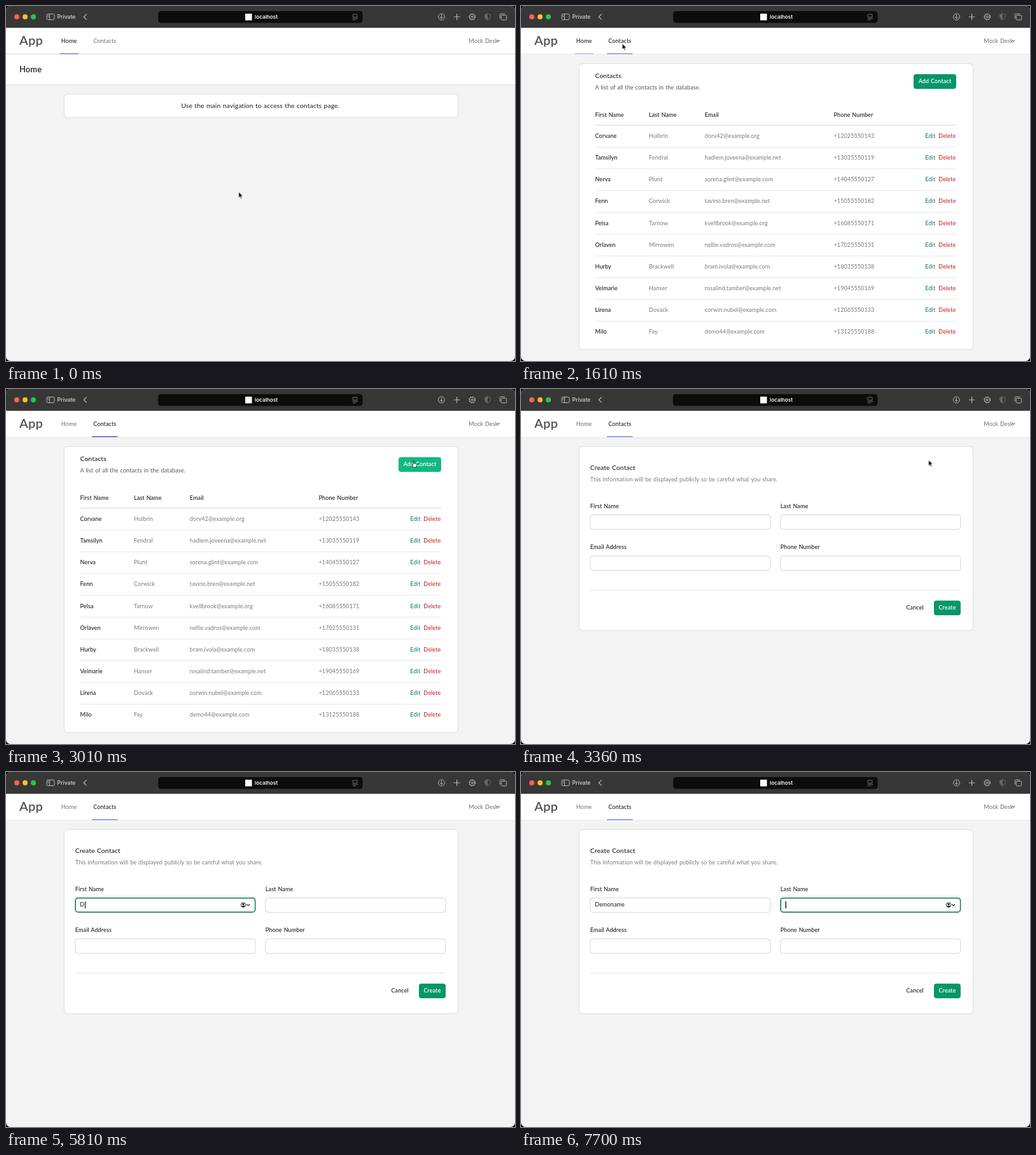
Write an HTML page that moves like this. It is 800 by 557 pixels and loops after 8000 ms.

```html
<!DOCTYPE html>
<html lang="en">
<head>
<meta charset="utf-8">
<title>Contacts app</title>
<style>
  html, body { margin: 0; width: 100%; height: 100%; overflow: hidden; background: #000; }
  #stage { position: relative; width: 800px; height: 557px; overflow: hidden; border-radius: 7px; background: #f3f3f3; }
  svg { position: absolute; left: 0; top: 0; }
  text, #typed { font-family: Lato, sans-serif; font-size: 9px; letter-spacing: .012em; word-spacing: .06em; }
  text { fill: #1b1f27; }
  .chrome text { font: 600 8.5px Inter, sans-serif; letter-spacing: 0; fill: #c4c4c4; }
  .icon { fill: none; stroke: #b4b4b4; stroke-width: 1; stroke-linecap: round; stroke-linejoin: round; }
  .lg { font-size: 10.3px; }
  .md { font-weight: 500; }
  .sb { font-weight: 600; }
  .dim { fill: #757a83; }
  .sub { fill: #52565f; }
  .edit { fill: #128a63; }
  .del { fill: #c62f2f; }
  .btn { fill: #059669; }
  .onbtn { fill: #fff; font-weight: 600; text-anchor: middle; }
  .card { fill: #fff; filter: drop-shadow(0 .7px .8px #0003); }
  .input { fill: #fff; stroke: #d3d5d9; }
  .focus { fill: none; stroke: #0b7a5b; stroke-width: 1.5; }
  .rule { stroke: #e6e6e8; }
  #typed { position: absolute; left: 116.3px; top: 200.5px; line-height: 14px; white-space: nowrap; color: #16181d; }
  #mark { position: relative; display: inline-block; width: 0; height: 0; }
  #caret { position: absolute; left: 0; top: -8px; width: 1.3px; height: 11px; background: #000; }
  #badge { position: absolute; left: -9.5px; top: 6px; width: 19px; height: 15px; border-radius: 8px; background: #007aff;
    color: #fff; font: 600 7.5px/15px Inter, sans-serif; text-align: center; box-shadow: 0 1px 3px #0002; }
</style>
</head>
<body>
<div id="stage">
  <svg width="800" height="557" viewBox="0 0 800 557">
    <g class="chrome">
      <rect width="800" height="34.5" fill="#373737"/>
      <circle cx="17" cy="17" r="4" fill="#ff5f57"/>
      <circle cx="30" cy="17" r="4" fill="#febc2e"/>
      <circle cx="43" cy="17" r="4" fill="#28c840"/>
      <rect x="239" y="8" width="321.500" height="18.500" rx="4.500" fill="#0c0c0c"/>
      <rect x="376" y="12" width="10.500" height="10.500" fill="#fff"/>
      <text x="80.500" y="20.200">Private</text>
      <text x="391" y="20.200" style="fill:#f4f4f4;font-size:8.2px">localhost</text>
      <g class="icon">
        <path d="M66 12.500h8q2 0 2 2v5q0 2-2 2h-8q-2 0-2-2v-5q0-2 2-2ZM68.500 12.500v9M65.700 15h1.200M65.700 17h1.200"/>
        <path d="M126.500 12.800 122.300 17l4.200 4.200" stroke-width="1.200"/>
        <path d="M545.500 13h6.500v4.500h-6.500ZM545 19.500h8M545 21.700h5" stroke="#777" stroke-width=".9"/>
        <circle cx="684.500" cy="17" r="5"/>
        <path d="M684.500 14v5.500M682.300 17.500l2.200 2.200 2.200-2.200"/>
        <path d="M704.300 17h8.600M708.600 12.700v8.600" stroke-width="1.200"/>
        <circle cx="732.800" cy="17" r="4.900" stroke-dasharray="1.600 2.250"/>
        <circle cx="732.800" cy="17" r="4.100"/>
        <circle cx="732.800" cy="17" r="1.500"/>
        <path d="M757 12q2 1.200 4.300 1.400v3.400q0 3.400-4.300 5.200-4.300-1.800-4.300-5.200v-3.400q2.300-.2 4.300-1.400Z" stroke="#686868"/>
        <path d="M757 12v10q-4.300-1.800-4.300-5.200v-3.400Z" fill="#686868" stroke="none"/>
        <path d="M779.500 14.500h6q1.200 0 1.200 1.200v5q0 1.200-1.200 1.200h-6q-1.200 0-1.200-1.200v-5q0-1.200 1.200-1.200ZM776.300 19.200v-5.700q0-1.200 1.200-1.200h6.500"/>
      </g>
    </g>

    <rect y="34.500" width="800" height="41" fill="#fff"/>
    <path d="M0 75.500H800" stroke="#ececee"/>
    <text x="21" y="61" class="sb" style="font-size:20px;fill:#505257">App</text>
    <text x="86.800" y="58" class="md" id="navHome">Home</text>
    <text x="137.200" y="58" class="md" id="navList">Contacts</text>
    <path d="M84.500 74.800H114" stroke="#7b8df2" stroke-width="1.400" id="lineHome"/>
    <path d="M135 74.800H175.500" stroke-width="1.400" id="lineList"/>
    <text x="727.300" y="57.500" class="md dim">Mock Desk</text>
    <path d="M771.800 53.300l2.200 2.300 2.200-2.300" fill="none" stroke="#6b7280" stroke-width="1.200"/>

    <g id="home">
      <rect y="76" width="800" height="47" class="card"/>
      <text x="21" y="103.600" class="sb" style="font-size:12.9px">Home</text>
      <rect x="92" y="139" width="618" height="35.500" rx="5" class="card"/>
      <text x="399.800" y="160" class="lg" text-anchor="middle">Use the main navigation to access the contacts page.</text>
    </g>

    <g id="list">
      <rect x="92" y="91" width="618" height="447.500" rx="5" class="card"/>
      <text x="116.500" y="112.600" class="lg md">Contacts</text>
      <text x="116.500" y="131.300" class="sub">A list of all the contacts in the database.</text>
      <rect x="617" y="107" width="67" height="23" rx="4" class="btn" id="add"/>
      <text x="650.500" y="121.200" class="onbtn">Add Contact</text>
      <path d="M116.500 187H684" stroke="#d6d7da"/>
      <g id="rows"></g>
    </g>

    <g id="form">
      <rect x="92" y="91" width="618" height="287.500" rx="5" class="card"/>
      <text x="108.800" y="126.800" class="lg md">Create Contact</text>
      <text x="108.800" y="145.400" class="dim">This information will be displayed publicly so be careful what you share.</text>
      <g id="fields"></g>
      <path d="M109 315.500H691" class="rule"/>
      <text x="605.500" y="346.200" class="md">Cancel</text>
      <rect x="649" y="332" width="42" height="23" rx="4" class="btn"/>
      <text x="670" y="346.200" class="onbtn">Create</text>
    </g>

    <g id="focus1"></g>
    <g id="focus2"><path d="M416.200 203v11" stroke="#000" stroke-width="1.300"/></g>
  </svg>

  <div id="typed"><span id="letters"></span><span id="mark"><i id="caret"></i><b id="badge">A</b></span></div>

  <svg width="800" height="557" viewBox="0 0 800 557">
    <g id="cursor">
      <path id="arrow" d="M0 0V9.200L2.100 7.300 3.500 10.500 5 9.900 3.600 6.700H6.500Z" fill="#000" stroke="#fff" stroke-width=".7"/>
      <path id="hand" d="M-.9 2.200q0-.9.8-.9t.8.900v3q1-.5 1.500.2 1-.4 1.400.3 1.300-.3 1.300.9v2.200q0 2.800-2.900 2.800-2 0-2.900-1.500L-2.500 7.600q-.3-.8.400-1 .6-.1 1.200.7Z" fill="#fff" stroke="#000" stroke-width=".8"/>
      <path id="beam" d="M-2-4.700q2 0 2 1.300 0-1.300 2-1.300M0-3.400V3.400M-2 4.700q2 0 2-1.300 0 1.300 2 1.300M-1 1H1" fill="none" stroke="#111" stroke-width=".9"/>
    </g>
  </svg>
</div>

<script>
const LOOP = 8000;
const $ = id => document.getElementById(id);
const text = (x, y, s, cls = '') => `<text x="${x}" y="${y}" class="${cls}">${s}</text>`;
const add = (id, markup) => $(id).insertAdjacentHTML('beforeend', markup);

// Contact table
const cols = [116.5, 201, 288.8, 491.5];
const people = `Corvane|Hulbrin|dorv42@example.org|+12025550143
Tamsilyn|Fendral|hadlem.joveena@example.net|+13035550119
Nerva|Plunt|sorena.glint@example.com|+14045550127
Fenn|Corwick|tavino.bren@example.net|+15055550182
Pelsa|Tarnow|kvellbrook@example.org|+16085550171
Orlaven|Mirrowen|nellie.vadros@example.com|+17025550131
Hurby|Brackwell|bram.ivola@example.com|+18035550138
Velmarie|Hanser|rosalind.tamber@example.net|+19045550169
Lirena|Dovack|corwin.nubel@example.com|+12065550133
Milo|Fay|demo44@example.com|+13125550188`.split('\n');

['First Name', 'Last Name', 'Email', 'Phone Number'].forEach((s, i) => add('rows', text(cols[i], 173.8, s, 'md')));
people.forEach((line, i) => {
  const y = 207 + i * 34.15;
  if (i) add('rows', `<path d="M116.5 ${y - 19.7}H684" class="rule"/>`);
  line.split('|').forEach((s, c) => add('rows', text(cols[c], y, s, c ? 'dim' : 'md')));
  add('rows', text(635.3, y, 'Edit', 'edit md') + text(656.3, y, 'Delete', 'del md'));
});

// Form fields
['First Name', 'Last Name', 'Email Address', 'Phone Number'].forEach((s, i) => {
  const x = 108.8 + (i % 2) * 299, y = 186.7 + (i >> 1) * 64.4;
  add('fields', text(x, y, s, 'md') +
    `<rect x="${x}" y="${y + 10.8}" width="283" height="22.8" rx="4" class="input"/>`);
});
['focus1', 'focus2'].forEach((id, i) => add(id, `<g transform="translate(${i * 299} 0)">
  <rect x="109.2" y="197.7" width="282.4" height="22" rx="4" class="focus"/>
  <circle cx="373" cy="208.600" r="3.600" fill="none" stroke="#111"/>
  <path d="M370.800 210.800q2.200-2 4.400 0l-2.200 1.200Z"/><circle cx="373" cy="207.700" r="1.500"/>
  <path d="M378.300 207.500l2.300 2.300 2.300-2.300" fill="none" stroke="#111" stroke-width="1.100"/></g>`));

// Timeline: each call becomes one looping keyframes rule
const sheet = document.head.appendChild(document.createElement('style'));
function anim(id, frames, timing = 'step-end') {
  const body = Object.entries(frames).map(([ms, css]) => `${ms / LOOP * 100}%{${css}}`).join('');
  sheet.append(`@keyframes k-${id}{${body}}#${id}{animation:k-${id} ${LOOP}ms ${timing} infinite}\n`);
}
function show(id, ...spans) {
  const frames = { 0: 'opacity:0' };
  for (const [from, to] of spans) {
    frames[from] = 'opacity:1';
    frames[to] = 'opacity:0';
  }
  anim(id, frames);
}

const OPEN = 1540, CREATE = 3290, FOCUS = 4480, NEXT = 7700;
show('home', [0, OPEN]);
show('list', [OPEN, CREATE]);
show('form', [CREATE, LOOP]);
show('focus1', [FOCUS, NEXT]);
show('focus2', [NEXT, LOOP]);
show('mark', [FOCUS, NEXT]);
show('badge', [FOCUS, 5210], [6230, 7560]);

const dark = 'fill:#1b1f27', gray = 'fill:#757a83';
anim('navHome', { 0: dark, 1610: dark, 1720: gray, 7999: gray, 8000: dark }, 'linear');
anim('navList', { 0: gray, 1400: gray, 1500: dark, 7999: dark, 8000: gray }, 'linear');
anim('lineHome', { 0: 'opacity:1', 1540: 'opacity:1', 1700: 'opacity:0', 8000: 'opacity:0' }, 'linear');
const line = c => 'stroke:' + c;
anim('lineList', {
  0: line('#d1d5db00'), 1400: line('#d1d5db00'), 1500: line('#d1d5db'), 1540: line('#d1d5db'),
  1640: line('#7d78d8'), 1760: line('#5b55cc'), 3290: line('#5b55cc'), 3340: line('#7f86ef'), 8000: line('#7f86ef')
}, 'linear');
anim('add', { 0: 'fill:#059669', 2870: 'fill:#10b981' });
anim('caret', {
  0: 'opacity:1', 4760: 'opacity:1', 4900: 'opacity:0', 5110: 'opacity:0', 5320: 'opacity:1', 8000: 'opacity:1'
}, 'linear');

// Typing
const keys = [5810, 6090, 6230, 6850, 7000, 7210, 7350, 7490];
[...'Demoname'].forEach((ch, i) => {
  add('letters', `<span id="key${i}">${ch}</span>`);
  anim('key' + i, { 0: 'font-size:0', [keys[i]]: 'font-size:9px', 8000: 'font-size:9px' });
});

// Pointer
const at = (x, y) => `transform:translate(${x}px,${y}px)`;
anim('cursor', {
  0: at(365.7, 291.7), 560: at(365.7, 291.7), 840: at(320, 180), 1050: at(320, 180),
  1480: at(159.2, 59), 2450: at(159.2, 59), 2940: at(640.6, 111.5), 4060: at(640.6, 111.5),
  4450: at(345, 213.7), 8000: at(345, 213.7)
}, 'ease-in-out');
show('arrow', [0, 1400], [OPEN, 2450], [2520, 2860], [CREATE, 4340]);
show('hand', [1400, OPEN], [2450, 2520], [2860, CREATE]);
show('beam', [4340, 5810]);
</script>
</body>
</html>
```
